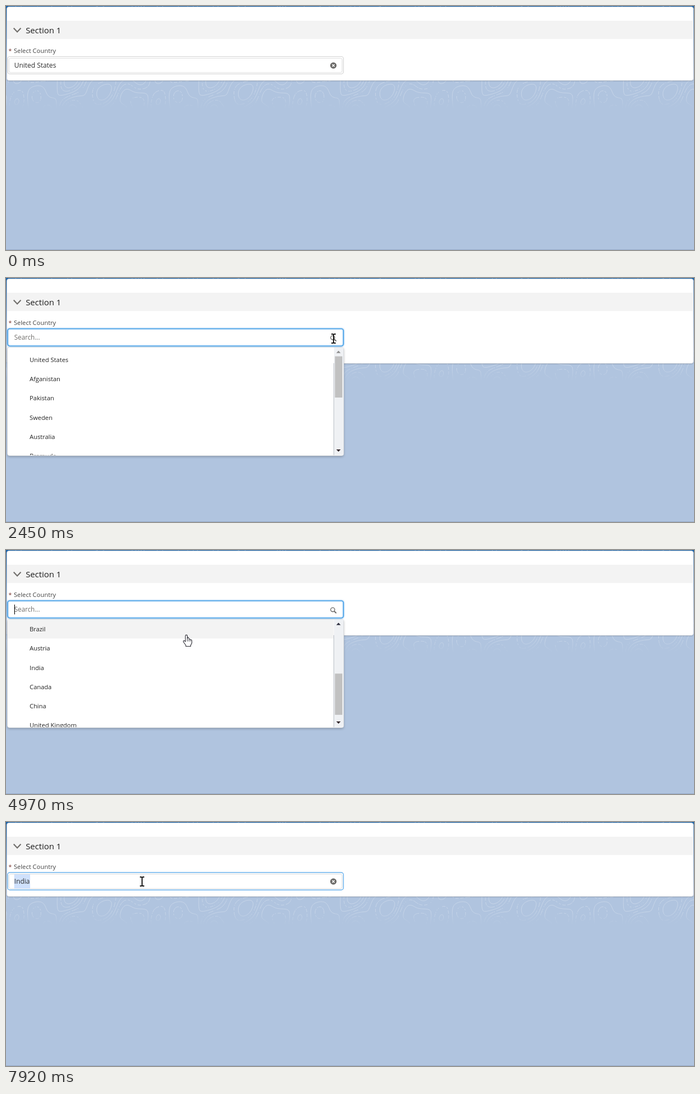
Animation of 1254 by 447 pixels, one loop 8000 ms. Source, as an HTML page with a canvas:

```html
<!DOCTYPE html>
<html lang="en">
<head>
<meta charset="utf-8">
<title>Country picker</title>
<style>
html, body { margin: 0; width: 100%; height: 100%; overflow: hidden; background: #b0c4df; }
canvas { display: block; width: 1254px; height: 447px; }
</style>
</head>
<body>
<canvas id="stage"></canvas>
<script>
const W = 1254, H = 447, LOOP = 8000;
const FONT = '"Open Sans", "Noto Sans", sans-serif';
const CLEAR = 2450, PICK = 5520, SELECT = 7720;
const ROW = 35.27, ROW_TOP = 131.7, LIST_TOP = 127, LIST_BOTTOM = 325;
const COUNTRIES = ['United States', 'Afganistan', 'Pakistan', 'Sweden', 'Australia', 'Bramuda',
  'Brazil', 'Austria', 'India', 'Canada', 'China', 'United Kingdom'];

// [time, x, y]
const POINTER = [
  [190, 1162, 394], [760, 105, 54], [900, 128, 80], [1230, 131, 82], [1850, 597, 113],
  [2050, 597, 113], [2120, 597, 111], [2450, 597, 111], [3070, 408, 103], [3140, 405, 104],
  [3340, 398, 110], [3540, 398, 110], [3900, 331, 150], [4100, 331, 150], [4170, 331, 153],
  [4510, 331, 153], [4900, 329, 156.5], [5040, 329, 156.5], [5310, 292, 204], [5520, 292, 204],
  [5800, 286, 204], [6440, 286, 204], [7050, 249, 110], [7200, 249, 110], [7250, 248, 109]
];
// [time, offset]
const SCROLL = [[4070, 0], [4310, 99.5], [4510, 99.5], [4950, 216.5], [5038, 216.5], [5110, 231]];
const PRESSES = [[2320, 2450], [5380, 5520], [7450, 7650], [7720, 7920]];

const canvas = document.getElementById('stage');
const ratio = window.devicePixelRatio || 1;
canvas.width = W * ratio;
canvas.height = H * ratio;
const c = canvas.getContext('2d');

function at(keys, t) {
  if (t <= keys[0][0]) return keys[0].slice(1);
  for (let i = 1; i < keys.length; i++) {
    const a = keys[i - 1], b = keys[i];
    if (t >= b[0]) continue;
    const u = (t - a[0]) / (b[0] - a[0]), e = u * u * (3 - 2 * u);
    return a.slice(1).map((v, k) => v + (b[k + 1] - v) * e);
  }
  return keys[keys.length - 1].slice(1);
}

function box(x, y, w, h, r, fill, stroke, width = 1) {
  c.beginPath();
  c.roundRect(x, y, w, h, r);
  if (fill) { c.fillStyle = fill; c.fill(); }
  if (stroke) { c.strokeStyle = stroke; c.lineWidth = width; c.stroke(); }
}

function line(points, color, width) {
  c.beginPath();
  points.forEach(([x, y]) => c.lineTo(x, y));
  c.strokeStyle = color;
  c.lineWidth = width;
  c.stroke();
}

function disc(x, y, r, color) {
  c.beginPath();
  c.arc(x, y, r, 0, 7);
  c.fillStyle = color;
  c.fill();
}

function text(s, x, y, size, color) {
  c.font = size + 'px ' + FONT;
  c.fillStyle = color;
  c.fillText(s, x, y);
}

function withShadow(color, blur, dy, draw) {
  c.save();
  c.shadowColor = color;
  c.shadowBlur = blur * ratio;
  c.shadowOffsetY = dy * ratio;
  draw();
  c.restore();
}

// Repeating height field whose level lines make the map pattern
function height(x, y) {
  const a = x / 258 * Math.PI * 2;
  return Math.sin(a + 1.3 * Math.sin(y / 24)) + 0.8 * Math.cos(2 * a + y / 21) +
    0.6 * Math.sin(3 * a - y / 17 + 1) + 0.35 * Math.cos(5 * a + y / 13);
}

function contours(g) {
  const s = 3;
  g.lineWidth = 1;
  for (let y = 0; y < 186; y += s) {
    if (y > 6 && y < 132) continue;
    g.strokeStyle = `rgba(255,255,255,${0.27 * Math.min(1, (187 - y) / 24)})`;
    g.beginPath();
    for (let x = 0; x < W; x += s) {
      const p = [[x, y], [x + s, y], [x + s, y + s], [x, y + s]];
      const h = p.map(q => height(...q));
      for (let n = 0; n < 7; n++) {
        if (n % 2 && (x + y) / s % 3 === 0) continue;
        const level = -1.9 + n * 0.62, hits = [];
        for (let i = 0; i < 4; i++) {
          const j = (i + 1) % 4;
          if ((h[i] < level) === (h[j] < level)) continue;
          const u = (level - h[i]) / (h[j] - h[i]);
          hits.push([p[i][0] + (p[j][0] - p[i][0]) * u, p[i][1] + (p[j][1] - p[i][1]) * u]);
        }
        for (let i = 0; i + 1 < hits.length; i += 2) {
          g.moveTo(...hits[i]);
          g.lineTo(...hits[i + 1]);
        }
      }
    }
    g.stroke();
  }
}

function makeBackdrop() {
  const layer = document.createElement('canvas');
  layer.width = canvas.width;
  layer.height = canvas.height;
  const g = layer.getContext('2d');
  g.scale(ratio, ratio);
  const sky = g.createLinearGradient(0, 0, 0, 132);
  sky.addColorStop(0, '#1b62a6');
  sky.addColorStop(0.4, '#4f83b9');
  sky.addColorStop(1, '#b0c4df');
  g.fillStyle = sky;
  g.fillRect(0, 0, W, H);
  contours(g);
  g.fillStyle = '#93a8c6';
  g.fillRect(0, H - 1, W, 1);
  return layer;
}

function drawCard(open) {
  const bottom = open ? 156.5 : 136.5;
  withShadow('rgba(0,0,0,.22)', 2, 1, () => box(1.5, 1.5, 1251.5, bottom - 1.5, 4, '#fff'));
  box(1.5, 1.5, 1251.5, bottom - 1.5, 4, null, 'rgba(200,205,212,.6)');
  c.fillStyle = '#f3f3f3';
  c.fillRect(2, 27, 1250.5, 33.5);
  line([[14, 40.5], [20.5, 47.5], [27, 40.5]], '#706e6b', 2.2);
  text('Section 1', 36, 50, 15.2, '#1b1b1b');
  text('*', 4.5, 86, 11, '#7c3a34');
  text('Select Country', 14.3, 86, 11.4, '#444');
}

function drawPill(label, focused, t) {
  box(3, 92.5, 612, 32, 4, '#fff', focused ? '#62adea' : '#d2d2d2', focused ? 1.4 : 1.2);
  box(5.5, 95.5, 607, 26.5, 3, '#fff', '#dcdcdc');
  if (t >= SELECT) {
    c.fillStyle = '#cfe1fc';
    c.fillRect(15, 96, 29, 26);
  }
  text(label, 15, 113, 12.25, '#2b2b2b');
  if (t >= 2320 && t < CLEAR) box(589.5, 101, 14.5, 16, 4, '#d5d5d5', '#8f8f8f', 1.6);
  disc(596.7, 109, 5.8, '#6b6a68');
  line([[594.5, 106.8], [598.9, 111.2]], '#fff', 1.4);
  line([[598.9, 106.8], [594.5, 111.2]], '#fff', 1.4);
}

function drawSearch(t) {
  withShadow('rgba(60,150,230,.6)', 3, 0, () => box(3, 93, 612, 31.5, 4, '#fff', '#4aa3e8', 1.7));
  text('Search...', 15, 113, 11.9, '#706e6b');
  c.beginPath();
  c.arc(595.5, 109.3, 3.7, 0, 7);
  c.strokeStyle = '#6b6a68';
  c.lineWidth = 1.4;
  c.stroke();
  line([[598.2, 112], [602, 115.7]], '#6b6a68', 1.9);
  if ((t - 2600 + LOOP) % 1000 < 500) {
    c.fillStyle = '#111';
    c.fillRect(15, 100, 1.2, 18);
  }
}

function triangle(x, y, dir, color) {
  c.beginPath();
  c.moveTo(x - 4, y + 2 * dir);
  c.lineTo(x + 4, y + 2 * dir);
  c.lineTo(x, y - 2.3 * dir);
  c.fillStyle = color;
  c.fill();
}

function drawList(scroll, x, y) {
  withShadow('rgba(0,0,0,.25)', 4, 2, () => box(2.5, 126.5, 613, 199, 4, '#fff'));
  box(2.5, 126.5, 613, 199, 4, null, '#d5d8dc');
  c.save();
  c.beginPath();
  c.rect(3, LIST_TOP, 612, LIST_BOTTOM - LIST_TOP - 0.5);
  c.clip();
  COUNTRIES.forEach((name, i) => {
    const top = ROW_TOP + i * ROW - scroll;
    if (x < 597 && y > LIST_TOP && y >= top && y < top + ROW) {
      c.fillStyle = '#f3f3f3';
      c.fillRect(3, top, 594.5, ROW);
    }
    text(name, 43, top + 22.2, 11.35, '#222');
  });
  c.fillStyle = '#eff1f4';
  c.fillRect(598, LIST_TOP, 17, 198);
  c.fillStyle = '#b9bfc7';
  c.fillRect(597, 156, 1, 169);
  c.fillStyle = '#c1c1c1';
  c.fillRect(599.5, 143.5 + scroll * 0.383, 13.5, 75.5);
  triangle(606, 135.5, 1, scroll > 0 ? '#2a2a3a' : '#8b8b8b');
  triangle(606, 316, -1, '#33282c');
  c.restore();
}

const ARROW = new Path2D('M.5 .5V16.2L4.2 12.8L6.8 18.3L9.2 17.2L6.8 11.8H11.6Z');
const HAND = new Path2D('M-2 10.5V1Q-2-.9-.3-.9Q1.5-.9 1.5 1V6.2Q3-0 4.6 6.8Q6.4 6 7.2 7.8' +
  'Q9.7 7.3 9.7 10V14L7.6 18V20H-1.2V18L-5.6 12Q-6.4 9-3.8 9.6L-2 11.3Z');
const IBEAM = new Path2D('M-4-8.3H-1.4L0-7.5L1.4-8.3H4M0-7.5V7.5M-4 8.3H-1.4L0 7.5L1.4 8.3H4');

function pointerShape(x, y, open) {
  if (open && y > LIST_TOP && y < LIST_BOTTOM && x < 597) return HAND;
  if (!open && Math.abs(x - 597) < 8 && Math.abs(y - 109) < 9) return HAND;
  if (x > 3 && x < 615 && y > 92 && y < 124) return IBEAM;
  return ARROW;
}

function drawPointer(x, y, open, pressed) {
  if (pressed) {
    c.save();
    c.globalCompositeOperation = 'multiply';
    disc(x - 1, y - 1, 11.5, '#f4f13c');
    c.restore();
  }
  const shape = pointerShape(x, y, open);
  c.save();
  c.translate(x, y);
  c.lineJoin = 'round';
  if (shape === IBEAM) {
    c.strokeStyle = '#111';
    c.lineWidth = 1.9;
  } else {
    c.fillStyle = '#fff';
    c.fill(shape);
    c.strokeStyle = '#26262e';
    c.lineWidth = 1.1;
  }
  c.stroke(shape);
  if (shape === HAND) {
    [[1.5, 6], [4.5, 6.8], [7.2, 7.8]].forEach(([kx, ky]) => line([[kx, ky], [kx, 11]], '#26262e', 0.9));
  }
  c.restore();
}

const backdrop = makeBackdrop();

function draw(t) {
  const open = t >= CLEAR && t < PICK;
  const [x, y] = at(POINTER, t);
  c.setTransform(1, 0, 0, 1, 0, 0);
  c.drawImage(backdrop, 0, 0);
  c.scale(ratio, ratio);
  drawCard(open);
  if (open) {
    drawList(at(SCROLL, t)[0], x, y);
    drawSearch(t);
  } else {
    drawPill(t < CLEAR ? 'United States' : 'India', t >= PICK, t);
  }
  if (t >= 190) drawPointer(x, y, open, PRESSES.some(([a, b]) => t >= a && t < b));
}

const start = performance.now();
function tick() {
  draw((performance.now() - start) % LOOP);
  requestAnimationFrame(tick);
}
tick();
</script>
</body>
</html>
```
